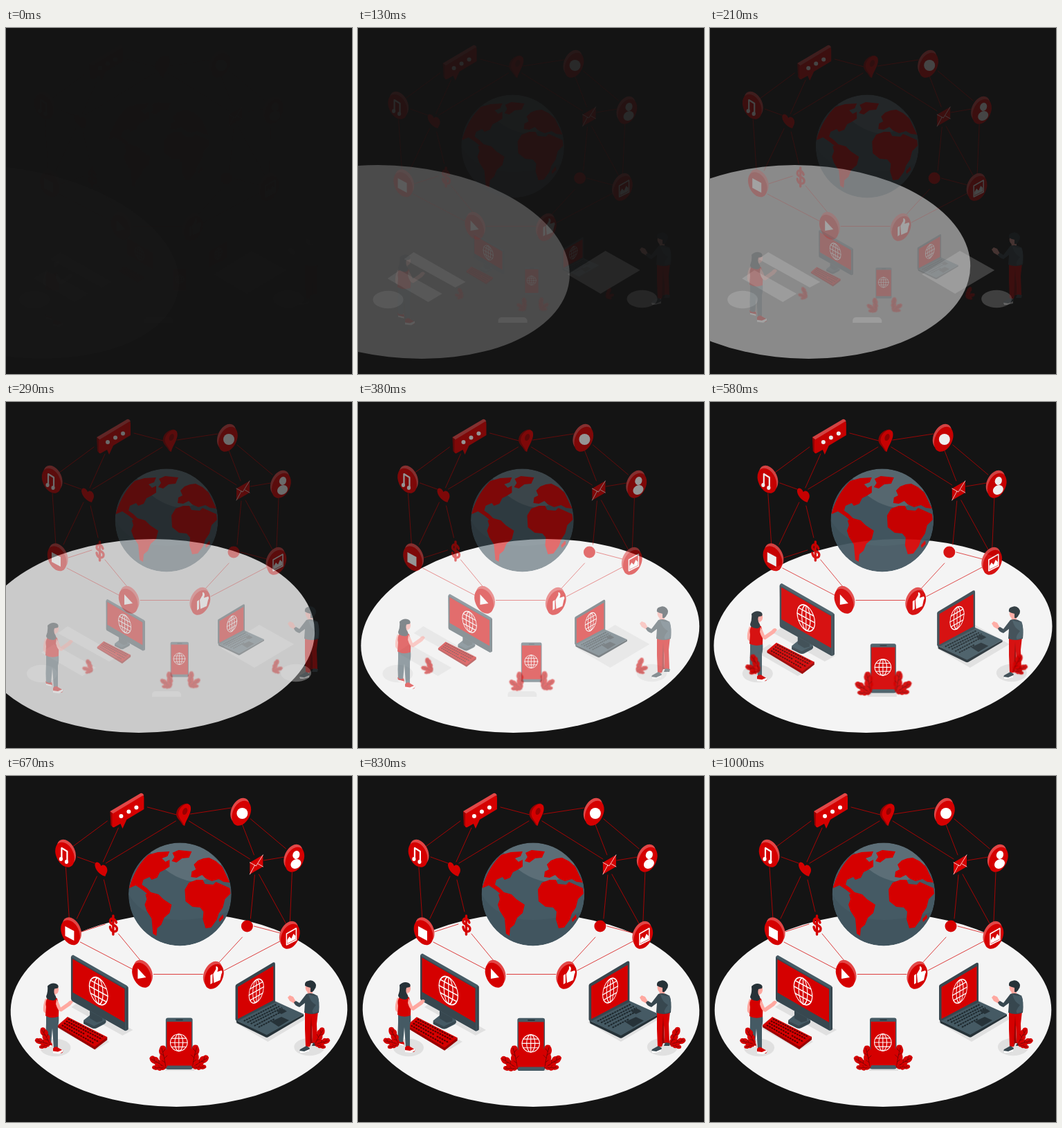
Write an HTML page that moves like this. It is 500x500 px and loops after 1040 ms.

```html
<!DOCTYPE html>
<html lang="en">
<head>
<meta charset="utf-8">
<title>Connected world</title>
<style>
html, body { margin: 0; height: 100%; overflow: hidden; background: #141414 }
svg { display: block; width: 100%; height: 100% }
.red { fill: #d50000 } .deep { fill: #980000 } .lite { fill: #e24747 }
.slate { fill: #455a64 } .navy { fill: #37474f } .ink { fill: #263238 }
.skin { fill: #ffa8a0 } .white { fill: #fff }
.line { fill: none; stroke-linecap: round; stroke-linejoin: round }
</style>
</head>
<body>
<svg viewBox="0 0 500 500">
<defs>
  <g id="coin">
    <ellipse class="lite" cx="2" cy="-1.5" rx="12.5" ry="19" transform="rotate(-25)"/>
    <ellipse class="red" cx="-1.5" cy="1.2" rx="12.5" ry="19" transform="rotate(-25)"/>
  </g>
  <g id="web" class="line" stroke="#fff" stroke-width=".9">
    <circle r="10"/><ellipse rx="4.8" ry="10"/>
    <path d="M0-10V10M-10 0H10M-8.6-5H8.6M-8.6 5H8.6"/>
  </g>
  <g id="leaf">
    <path class="red" d="M0 0Q-7-2-6-9Q-11-12-8-19Q-12-25-7-32Q0-34 1-27Q5-23 2-18Q6-13 2-9Q4-4 0 0Z"/>
    <path class="line" stroke="#5a0808" stroke-width=".7" d="M0 0C-1-10-3-20-6-29M-1-8L-5-11M-2-14L2-18M-3-18L-7-21M-4-23L-1-27"/>
  </g>
  <g id="plant">
    <use href="#leaf"/>
    <use href="#leaf" transform="rotate(-46)scale(.84)"/>
    <use href="#leaf" transform="rotate(-78)scale(.6)"/>
  </g>
  <clipPath id="ball"><circle cx="251" cy="171" r="74.4"/></clipPath>
</defs>

<ellipse id="floor" rx="243.3" ry="140" fill="#f4f4f4"/>

<g id="shadows" fill="#e0e0e0">
  <ellipse cx="71" cy="392.5" rx="22" ry="12.8"/>
  <ellipse cx="438" cy="391.5" rx="22" ry="12.8"/>
  <path d="M108 324L183 367L168 375L94 334ZM70 362L88 350L149 384L129 396ZM330 356L385 322L435 350L378 384Z"/>
  <path d="M230 422Q231 418 235 418H267Q270 418 272 422V426H230Z"/>
</g>

<g id="devices">
  <!-- monitor -->
  <path class="slate" d="M113 353L123 345L140 346L145 353Q146 357 142 359L132 364Q128 366 124 363L114 357Z"/>
  <path class="navy" d="M113 354L128 361L145 353V356L131 364Q128 365 125 364L113 358Z"/>
  <path class="navy" d="M122 338L140 348V354L132 356L122 350Z"/>
  <path class="slate" d="M95 262Q95 260 98 259L175 303Q177 304 177 307V366L173 368L96 325Z"/>
  <path class="navy" d="M95 262L173 307V368L97 325Q95 324 95 322ZM174 306L177 305V366L174 368Z"/>
  <path class="red" d="M97.500 265L172 308V356L97.500 313Z"/>
  <use href="#web" transform="matrix(1.32 .72 0 1.85 134.500 311)"/>
  <!-- keyboard -->
  <path class="deep" d="M76 360V363L129 395L147 381V377Z"/>
  <path class="red" d="M76 360L90 348L147 377L129 391Z"/>
  <g class="line" stroke="#500" stroke-width="2" stroke-dasharray="2.6 1.2" style="stroke-linecap:butt">
    <path d="M91 351L142 377M88 354L139 380M85 357L115 373M118 375L135 384M82 360L128 386"/>
  </g>
  <!-- laptop -->
  <path class="ink" d="M332 353L376 373L429 344V347L378 377Q376 378 374 377L333 357Z"/>
  <path class="slate" d="M332 353L387 325L429 344L376 374Z"/>
  <path class="navy" d="M331 304Q331 302 333 301L385 270Q388 269 388 272V327L334 354Q332 354 331 352Z"/>
  <path class="red" d="M334.500 305L385.500 275V324L334.500 351Z"/>
  <use href="#web" transform="matrix(1.05 -.6 0 1.62 361 311)"/>
  <path class="ink" d="M382 355L397 348L408 353L393 362Z"/>
  <g class="line" stroke="#1d282d" stroke-width="2" stroke-dasharray="2.800 1" style="stroke-linecap:butt">
    <path d="M343 354L390 330M348 356L394 333M353 358L398 335M358 361L402 338M364 363L387 351"/>
  </g>
  <path class="ink" d="M390 340L398 336L405 340L397 344Z"/>
  <!-- phone -->
  <rect class="slate" x="231" y="349.500" width="38.500" height="74" rx="3"/>
  <rect class="red" x="232.500" y="355" width="35.500" height="63"/>
  <path class="line" stroke="#263238" stroke-width="1.500" d="M246 352.500H255"/>
  <use href="#web" transform="translate(249.800 385)scale(1.22)"/>
</g>

<g id="woman">
  <path class="skin" d="M57 322Q53 332 54 340Q56 345 62 344L62 338L58 336L61 325Z"/>
  <path class="skin" d="M61 386L66 385L67 392L62 391ZM69 391L75 391L76 398L70 398Z"/>
  <path class="slate" d="M58 346L76 346Q77 355 75 362L75 394H69L67 365L65 388H58Q57 372 58 358Z"/>
  <path class="red" d="M57 384Q60 388 66 386L67 390L58 388Z"/>
  <path class="white" d="M58 388L66 390V392L58 390Z"/>
  <path class="red" d="M68 394Q72 390 75 393L82 397Q83 400 80 401L68 399Z"/>
  <path class="white" d="M68 398L75 399L82 396V399L77 402L68 401Z"/>
  <path class="red" d="M61 320Q68 317 74 322Q77 331 76 348Q66 352 57 347L58 334Q56 326 61 320Z"/>
  <path class="skin" d="M73 323Q77 329 79 335L89 328Q92 324 95 325L97 327L93 332L80 341Q75 341 72 330Z"/>
  <ellipse class="skin" cx="71.500" cy="309" rx="4.600" ry="6.500"/>
  <path class="skin" d="M67 312H72L71 321Q68 323 66 319Z"/>
  <path class="ink" d="M60 304Q66 298 73 301Q77 303 75 307L70 308Q68 314 72 319Q74 324 68 325Q58 324 58 319Q61 312 60 304Z"/>
</g>

<g id="man">
  <path class="skin" d="M444 382L449 383V389H444ZM433 388L438 389V394H433Z"/>
  <path class="red" d="M432 340H451L449 358L450 386H443L442 360L439 391H433L432 366Z"/>
  <path class="deep" d="M441 346L443 386L441 386L439 391L440 362Z"/>
  <path class="navy" d="M434 390L439 393L437 398L426 400Q423 398 425 395ZM444 385L451 386L450 390L442 390Z"/>
  <path class="white" d="M424 397L431 398L438 395V398L429 400H425Z"/>
  <path class="skin" d="M419 326L415 319L410 317L407 320L410 325L417 329ZM435 307H443V316H436Z"/>
  <path class="navy" d="M434 315Q442 312 449 317Q454 325 452 342Q442 346 431 342L432 328L424 334Q417 332 416 327L419 325L424 328Z"/>
  <path class="slate" d="M437 315Q445 319 450 317Q454 325 451 341L444 343Q440 340 448 331Q439 326 437 315Z"/>
  <ellipse class="skin" cx="437.500" cy="306" rx="4.800" ry="6.500"/>
  <path class="ink" d="M432 303Q431 297 437 296Q442 294 446 298Q450 303 446 308Q444 313 440 312L440 306Q435 305 432 303Z"/>
</g>

<g id="plants">
  <use href="#plant" transform="translate(231 422)"/>
  <use href="#plant" transform="translate(269.500 421)scale(-1 1)"/>
  <use href="#plant" transform="translate(65 388)rotate(-18)scale(.82)"/>
  <use href="#plant" transform="translate(445 388)scale(-.82 .82)rotate(-18)"/>
</g>

<g id="network">
  <path class="line" stroke="#d50000" stroke-width=".75" d="M204 45L246 56M266 55L325 46M353 62L404 105M341 70L358 114M372 122L402 117M264 65L352 120M245 65L144 126M162 75L140 124M146 65L96 102M103 117L128 126M86 132L91 207M131 145L102 206M141 150L152 196M109 225L143 214M107 240L182 279M162 228L195 268M213 286.500H284M306 271L341 233M315 281L397 238M358 217L396 227M353 206L359 143M365 142L404 213M413 139L410 210"/>

  <g clip-path="url(#ball)">
    <circle class="slate" cx="251" cy="171" r="74.400"/>
    <path fill="#fff" fill-opacity=".12" d="M207 108Q240 88 284 101L311 127Q294 158 261 151Q226 141 207 108Z"/>
    <path class="ink" fill-opacity=".12" d="M176 170Q210 230 325 195V250H170Z"/>
    <path class="red" d="M178 160Q187 131 205 114L219 110L236 109L233 116L225 119L230 124L236 121V131L228 136L222 139L218 147L210 150L207 146L198 150L196 157L203 162L212 171L206 172L196 164L187 158L178 162Z"/>
    <path class="red" d="M240 111L249 107L268 109L264 118L254 119L246 125L239 123L243 117Z"/>
    <path class="red" d="M201 171L209 168L220 171L227 178L239 186L236 198L228 205L224 215L218 220L217 231L212 228L210 206L203 195L200 186L203 178Z"/>
    <path class="red" d="M267 146L268 138L274 135L271 128L277 122L285 119L293 118L303 123L312 131L323 154L314 153L307 149L297 152L288 148L283 143L275 147Z"/>
    <path class="red" d="M258 164L264 154L275 150L284 150L287 156L299 157L303 153L312 157L323 162L324 170L316 178L313 190L307 199L304 208L296 219L288 220L284 207L285 196L280 190L269 189L259 181Z"/>
    <path class="red" d="M307 207L313 200L314 205L308 211Z"/>
  </g>

  <!-- speech bubble -->
  <path class="lite" d="M150 51L194 25Q197 24 199 28L154 56Z"/>
  <path class="deep" d="M150 51L154 54V74L151 71Z"/>
  <path class="red" d="M153 55L196 29Q199 27 199 31V48L174 63L168 76L165 69L156 74Q153 75 153 71Z"/>
  <g class="white"><circle cx="166" cy="58" r="3"/><circle cx="177" cy="51.500" r="3"/><circle cx="188" cy="45.500" r="3"/></g>
  <!-- pin -->
  <path class="deep" d="M255 71C250 62 244 60 246 52C248 43 260 37 264 41L258 72Z"/>
  <path class="red" fill-rule="evenodd" d="M257 72C253 62 247 60 249 52C252 42 263 37 266 43C269 51 262 60 257 72ZM256 56C261 57 264 48 260 46C255 46 253 54 256 56Z"/>
  <!-- heart and envelope -->
  <path class="red" d="M143 145C134 143 128 134 128 128C129 122 135 124 137 130C140 126 146 130 146 136C146 140 144 141 143 145Z"/>
  <path class="red" d="M352 125L371 114V131L352 142Z"/>
  <path class="line" stroke="#fff" stroke-width=".8" d="M352 125L361 130L371 114M352 142L359 129M371 131L364 127"/>
  <!-- dollar and plain badge -->
  <path class="line" stroke="#d50000" stroke-width="3.400" d="M159 212C157 205 150 204 150 210C150 216 160 214 160 221C160 227 151 226 150 218M154.500 202V229"/>
  <circle class="red" cx="348" cy="217" r="8.500"/>
  <!-- coins -->
  <use href="#coin" x="85.500" y="112"/>
  <use href="#coin" x="93.500" y="224.500"/>
  <use href="#coin" x="196.500" y="286"/>
  <use href="#coin" transform="translate(339 52)scale(-1 1)"/>
  <use href="#coin" transform="translate(416 119)scale(-1 1)"/>
  <use href="#coin" transform="translate(409.500 230)scale(-1 1)"/>
  <use href="#coin" transform="translate(299.500 288)scale(-1 1)"/>
  <circle class="white" cx="341" cy="54" r="8"/>
  <path class="white" d="M85 217L98 224V238L85 231Z"/>
  <path class="line" stroke="#fff" stroke-width="2.200" d="M80 120V104L88 109V125"/>
  <ellipse class="white" cx="79" cy="120" rx="2.600" ry="3"/><ellipse class="white" cx="87" cy="124" rx="2.600" ry="3"/>
  <path class="white" d="M190 278L202 291L190 293Z"/>
  <ellipse class="white" cx="419" cy="114" rx="5" ry="6" transform="rotate(20 419 114)"/>
  <ellipse class="white" cx="418.500" cy="127" rx="8" ry="6.500" transform="rotate(-35 418.500 127)"/>
  <path class="line" stroke="#fff" stroke-width="1.500" d="M405 228L419 220V237L405 244Z"/>
  <path class="white" d="M406 242V237L409 232L412 235L415 228L418 231V236Z"/>
  <path class="white" d="M295 288L298 286V299L295 301ZM299 286L303 279V275Q306 275 306 279L305 283L311 281Q313 283 311 286L309 295L300 299Z"/>
</g>
</svg>

<script>
const LOOP = 1040, STEP = 1000 / 24, LEAD = 30;
const el = id => document.getElementById(id);
const curve = (u, a, b) => 3 * (1 - u) ** 2 * u * a + 3 * (1 - u) * u * u * b + u ** 3;

// cubic-bezier(.36, -.01, .5, 1.38), solved by bisection
function ease(x) {
  if (x >= 1) return 1;
  let lo = 0, hi = 1;
  for (let i = 0; i < 24; i++) {
    const mid = (lo + hi) / 2;
    if (curve(mid, .36, .5) < x) lo = mid; else hi = mid;
  }
  return curve(lo, -.01, 1.38);
}

function pose(id, opacity, transform = '') {
  el(id).setAttribute('opacity', Math.max(0, Math.min(1, opacity)));
  el(id).setAttribute('transform', transform);
}

function drawFloor(p) {
  let shift = 0, skew, opacity = 1;
  if (p < .6) {
    opacity = ease(p / .6);
    shift = -250 * (1 - opacity);
    skew = 20 - 30 * opacity;
  } else if (p < .8) skew = -10 + 12 * ease((p - .6) / .2);
  else skew = 2 - 2 * ease((p - .8) / .2);
  pose('floor', opacity, `translate(${250 + shift} 338)skewX(${skew})`);
}

const zoom = (e, x, y) => `translate(${x} ${y})scale(${.5 + .5 * e})translate(${-x} ${-y})`;

function draw(ms) {
  const p = (Math.floor((ms + 3.5) / STEP) * STEP + LEAD) / 1000;
  const e = ease(p), away = 30 * (1 - e);
  drawFloor(p);
  pose('shadows', e, `translate(${-away} 0)`);
  pose('network', e, `translate(${-away} 0)`);
  pose('woman', e, `translate(0 ${away})`);
  pose('man', e);
  pose('devices', e, zoom(e, 252, 341));
  pose('plants', e, zoom(e, 255, 390));
}

const start = performance.now();
function tick() {
  draw((performance.now() - start) % LOOP);
  requestAnimationFrame(tick);
}
tick();
</script>
</body>
</html>
```
